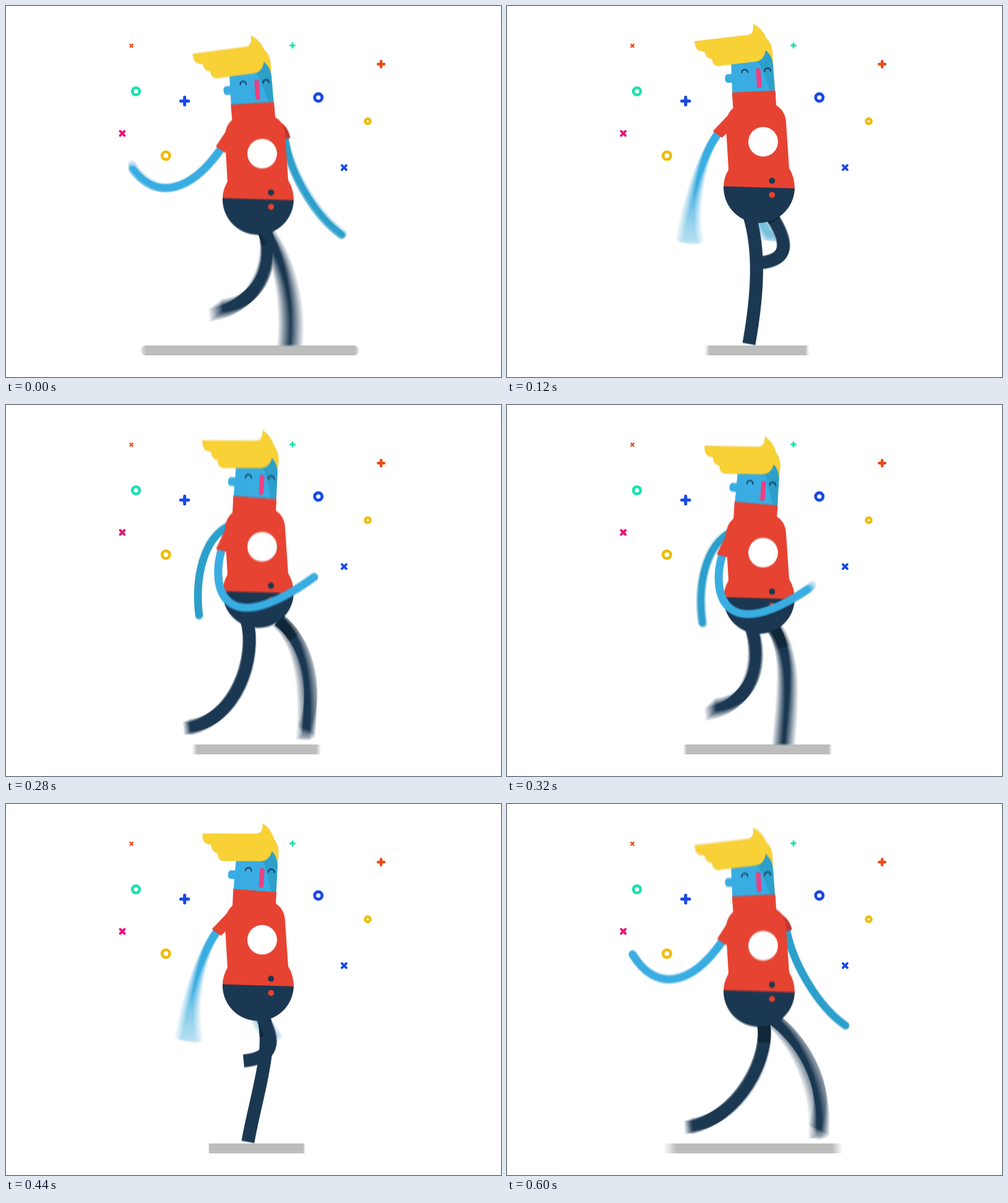
Recreate the animation shown at these times as an HTML page with a canvas. Size 800x600 px, loop 640 ms.

```html
<!DOCTYPE html>
<html lang="en">
<head>
<meta charset="utf-8">
<title>Walk cycle</title>
<style>
  html, body { margin: 0; width: 100%; height: 100%; overflow: hidden; background: #fff; }
  canvas { display: block; }
</style>
</head>
<body>
<canvas id="stage" width="800" height="600"></canvas>
<script>
const LOOP = 640, HALF = LOOP / 2, STEP = 40, SHUTTER = 20, SAMPLES = 14;
const RED = '#e74332', DARK_RED = '#c4372d', NAVY = '#1b3852', SHADE = '#0f2738',
      SKIN = '#39ade2', DARK_SKIN = '#2c9fcb', HAIR = '#f8d137', PINK = '#f03f82';

const stage = document.getElementById('stage').getContext('2d');
const layer = document.createElement('canvas');
layer.width = 800;
layer.height = 600;
const ctx = layer.getContext('2d');

// Limbs are cubic curves: start, two handles, end.
// Each arm swings through three poses: out, down, across.
const nearArm = [
  [347, 213, 298, 283, 241, 295, 203, 233],
  [340, 207, 312, 245, 295, 325, 295, 378],
  [348, 225, 330, 290, 355, 372, 498, 268]
];
const farArm = [
  [452, 195, 462, 245, 500, 315, 547, 348],
  [410, 195, 370, 250, 395, 330, 428, 374],
  [362, 184, 318, 205, 305, 270, 312, 330]
];
// Hip at rest, its travel forward, and where the foot lands.
const nearLeg = { hip: 389, travel: 42, front: 511, delay: 0 };
const farLeg = { hip: 413, travel: 28, front: 490, delay: HALF };

const mod = (a, n) => ((a % n) + n) % n;
const smooth = x => x * x * x * (x * (6 * x - 15) + 10);

// 0 at the given time, 1 half a loop later, then back.
const sway = (t, from) => smooth(Math.abs(mod(t - from + HALF, LOOP) - HALF) / HALF);

// 1 as the legs are furthest apart, 0 as they pass.
const spread = t => Math.abs(mod(t, HALF) / HALF * 2 - 1);

function armPose([out, down, across], s) {
  return out.map((v, i) => v * (1 - s) * (1 - 2 * s) + down[i] * 4 * s * (1 - s) + across[i] * s * (2 * s - 1));
}

// The foot slides back for half the loop, then lifts and swings forward.
function legPose({ hip, travel, front, delay }, t, rise) {
  const beat = mod(t + 40 + delay, LOOP) / HALF, q = beat % 1, w = 2 * q - 1;
  const swing = beat >= 1, back = 286;
  const arc = k => Math.sin(Math.PI * q ** k);
  const lift = swing ? arc(1) : 0;
  const forward = swing ? q : (1 - q) ** 4;
  const mid = swing ? hip - 5 : 391;
  const footX = mid + w * w * ((swing === w > 0 ? front : back) - mid);
  const footY = swing ? 523 + 12 * q - 115 * arc(1.15) : 535 - 12 * q + 20 * arc(0.6);
  const ankle = (5 + 80 * (swing ? 1 - q ** 8 : q ** 4)) * Math.PI / 180;
  const shin = 82 - 34 * lift;
  const x = hip + travel * forward, y = 338 + rise;
  return {
    curve: [x, y, x + 16 + 26 * forward, y + 60 - 30 * forward,
      footX + shin * Math.sin(ankle), footY - shin * Math.cos(ankle), footX, footY],
    shade: 38 - 28 * lift
  };
}

function fill(color, path) {
  ctx.fillStyle = color;
  ctx.fill(new Path2D(path));
}

function dot(x, y, r, color) {
  ctx.fillStyle = color;
  ctx.beginPath();
  ctx.arc(x, y, r, 0, Math.PI * 2);
  ctx.fill();
}

function limb([x, y, ...rest], width, color, cap, length) {
  ctx.strokeStyle = color;
  ctx.lineWidth = width;
  ctx.lineCap = cap;
  ctx.setLineDash(length ? [length, 999] : []);
  ctx.beginPath();
  ctx.moveTo(x, y);
  ctx.bezierCurveTo(...rest);
  ctx.stroke();
  ctx.setLineDash([]);
}

// Corners of the sleeve's hem, square to the start of the arm.
function hem([x, y, hx, hy]) {
  const k = 9 / Math.hypot(hx - x, hy - y), dx = (hy - y) * k, dy = (x - hx) * k;
  return [`${x - dx} ${y - dy}`, `${x + dx} ${y + dy}`];
}

function drawFloor(t) {
  const wide = spread(t) ** 2, big = mod(t + HALF / 2, LOOP) < HALF;
  const left = 331 - wide * (big ? 118 : 46), right = 479 + wide * (big ? 96 : 46);
  ctx.save();
  ctx.beginPath();
  ctx.roundRect(218, 549, 352, 16, 8);
  ctx.clip();
  ctx.fillStyle = '#bcbdbc';
  ctx.fillRect(left, 549, right - left, 16);
  ctx.restore();
}

function drawHead(t) {
  ctx.save();
  ctx.translate(386, 168);
  ctx.rotate((sway(t, 40) - 0.5) * 9 * Math.PI / 180);
  ctx.translate(-386, -168);
  fill(HAIR, 'M406 40L425 52Q435 62 435 78L434 104L415 90Z');
  fill(SKIN, 'M367 86H424V139H366Z');
  fill(SKIN, 'M369 108H361Q355.500 108 355.500 115Q355.500 122 361 122H369Z');
  fill(DARK_SKIN, 'M400 88L423 72Q434 82 434.500 97L435 139H426.500Z');
  fill(SKIN, 'M399 88L412 92Q417 102 427 139H380V88Z');
  fill(HAIR, 'M310 51.500L398 46.500Q408 44 406 29Q420 36 426 53L424 73'
    + 'Q421 89 407 90.500L345 94Q337 92 336.500 82Q327 81 325 69Q313 69 311 59Z');
  ctx.strokeStyle = '#1b3450';
  ctx.lineWidth = 2;
  ctx.lineCap = 'round';
  for (const x of [388, 425]) {
    ctx.beginPath();
    ctx.arc(x, 107, 4.8, Math.PI, 0);
    ctx.stroke();
  }
  ctx.fillStyle = PINK;
  ctx.beginPath();
  ctx.roundRect(406.3, 101.5, 7.4, 31.5, 2.5);
  ctx.fill();
  fill(RED, 'M365.500 138L435.500 139V176H366Z');
  ctx.restore();
}

function drawBody() {
  fill(RED, 'M366 164Q353 175 354 195L358 264Q350 278 350 292L465 295.500'
    + 'Q465 276 456 262L451 188Q450 169 435 160Z');
  ctx.fillStyle = NAVY;
  ctx.beginPath();
  ctx.arc(407.5, 292.7, 57.5, 0.03, Math.PI + 0.03);
  ctx.fill();
  dot(428.3, 282, 4.9, NAVY);
  dot(428.3, 305, 4.9, RED);
  dot(414, 219, 24, '#fff');
}

function drawScene(t) {
  const rise = 21.5 * spread(t) ** 2.6;
  const swing = sway(t, 600);
  const near = armPose(nearArm, swing), far = armPose(farArm, swing);
  const nearHem = hem(near), farHem = hem(far);
  const rear = legPose(farLeg, t, rise);

  ctx.fillStyle = '#fff';
  ctx.fillRect(0, 0, 800, 600);
  drawFloor(t);

  ctx.save();
  ctx.translate(0, rise);
  limb(far, 12.5, DARK_SKIN, 'round');
  fill(DARK_RED, `M440 166Q456 174 ${farHem[1]}L${farHem[0]}L420 190Z`);
  ctx.restore();

  limb(rear.curve, 21, NAVY, 'butt');
  limb(rear.curve, 21, SHADE, 'butt', rear.shade);
  limb(legPose(nearLeg, t, rise).curve, 21, NAVY, 'butt');

  ctx.save();
  ctx.translate(0, rise);
  drawHead(t);
  drawBody();
  limb(near, 13, SKIN, 'round');
  fill(RED, `M366 167L${nearHem[0]}L${nearHem[1]}L372 190Z`);
  ctx.restore();
}

function ring(x, y, r, width, color) {
  stage.strokeStyle = color;
  stage.lineWidth = width;
  stage.beginPath();
  stage.arc(x, y, r, 0, Math.PI * 2);
  stage.stroke();
}

function cross(x, y, arm, width, color, turn = 0) {
  stage.save();
  stage.translate(x, y);
  stage.rotate(turn);
  stage.strokeStyle = color;
  stage.lineWidth = width;
  stage.lineCap = 'round';
  stage.stroke(new Path2D(`M${-arm} 0H${arm}M0 ${-arm}V${arm}`));
  stage.restore();
}

function drawConfetti() {
  const blue = '#1748e8', green = '#16e3ae', orange = '#ea4a14', gold = '#edbd0c';
  const tilt = Math.PI / 4;
  cross(202.7, 64.2, 3, 2.4, orange, tilt);
  cross(463, 63.8, 3.5, 3, green);
  cross(606.2, 94, 4.8, 4.4, orange);
  cross(288.7, 153.8, 6.2, 5, blue);
  cross(188, 206, 5, 3.8, '#ec0f7c', tilt);
  cross(546.4, 261.3, 5, 3.8, blue, tilt);
  ring(210, 138, 5.8, 4.6, green);
  ring(504.8, 148, 6, 4.8, blue);
  ring(584.6, 186.4, 4.1, 4.4, gold);
  ring(258.4, 242, 6.2, 4.8, gold);
}

// Averages several moments of the open shutter for motion blur.
function expose(t) {
  for (let i = 0; i < SAMPLES; i++) {
    drawScene(t + ((i + 0.5) / SAMPLES - 0.5) * SHUTTER);
    stage.globalAlpha = 1 / (i + 1);
    stage.drawImage(layer, 0, 0);
  }
  stage.globalAlpha = 1;
  drawConfetti();
}

const start = performance.now();
let shown = -1;

function tick() {
  const step = Math.floor(mod(performance.now() - start, LOOP) / STEP);
  if (step !== shown) {
    shown = step;
    expose(step * STEP);
  }
  requestAnimationFrame(tick);
}
tick();
</script>
</body>
</html>
```
